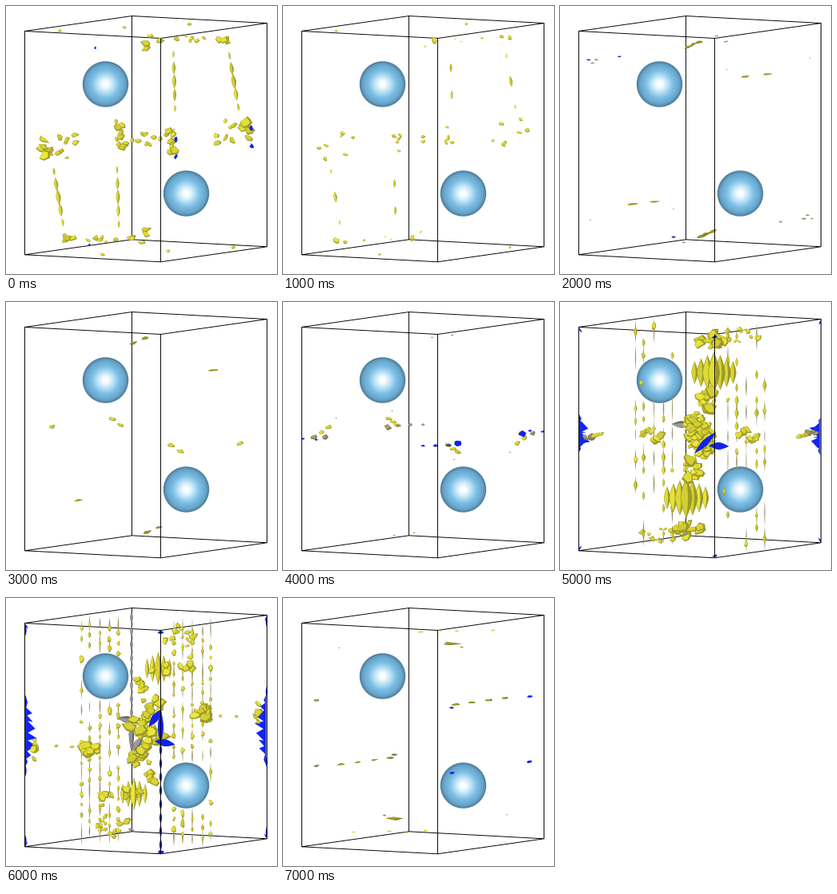
These frames come from a looping animation (339 by 336 pixels, 8 s). A matplotlib script:

```python
import numpy as np
import matplotlib.pyplot as plt
from matplotlib.animation import FuncAnimation
from matplotlib.collections import PolyCollection

W, H, DPI = 339, 336, 64
PX = 72 / DPI
MIRROR = np.array([349.5, 333.0])   # the cell is symmetric about its centre
SPHERES = [(124.5, 98.0), (225.5, 235.0)]
RADIUS = 28.7
COLUMNS = [94, 104, 117, 129, 140]

TONES = {
    "gold": (0.90, 0.88, 0.22),
    "olive": (0.66, 0.62, 0.13),
    "khaki": (0.64, 0.62, 0.42),
    "gray": (0.62, 0.62, 0.60),
    "blue": (0.08, 0.14, 0.97),
}


def place(shape, x, y, w, h, tilt):
    a = np.radians(-tilt)
    turn = np.array([[np.cos(a), np.sin(a)], [-np.sin(a), np.cos(a)]])
    return shape * (w / 2, h / 2) @ turn + (x + 0.5, y + 0.5)


def bit(rng, tone, x, y, w, h, tilt=0):
    """Small faceted fragment as a list of (polygon, colour)."""
    base = np.array(TONES[tone])
    if h > 2 * w:
        t = np.linspace(-1, 1, 7)
        side = 1 - np.abs(t) ** 1.5
        shape = np.r_[np.c_[side, t], np.c_[-side, -t]]
        light = np.c_[np.r_[side * 0.3, -side * 0.9], np.r_[t, -t] * 0.92]
    else:
        n = rng.integers(4, 8)
        a = (np.arange(n) + rng.uniform(-0.3, 0.3, n)) * 2 * np.pi / n
        r = rng.uniform(0.75, 1.3, n)
        shape = np.c_[r * np.cos(a), r * np.sin(a)]
        light = shape * 0.76 - (0.1, 0.14)
    if tone == "blue" or min(w, h) < 2.5:
        return [(place(shape, x, y, w, h, tilt), base * 0.95)]
    return [(place(shape, x, y, w, h, tilt), base * 0.68),
            (place(light, x, y, w, h, tilt), base * rng.uniform(0.9, 1.03))]


def pairs(rng, tone, twin, rows):
    """Fragments (x, y, width, height, tilt) with their inverted twins."""
    parts = []
    for x, y, *rest in rows:
        parts += bit(rng, tone, x, y, *rest)
        if twin:
            parts += bit(rng, twin, *(MIRROR - (x, y)), *rest)
    return parts


def cluster(rng, x, y, rx, ry, n, size):
    """Fragments strewn over an ellipse."""
    rows = []
    for _ in range(n):
        a, r = rng.uniform(0, 2 * np.pi), np.sqrt(rng.random())
        w = size * rng.uniform(0.7, 1.5)
        rows.append((x + rx * r * np.cos(a), y + ry * r * np.sin(a),
                     w, w * rng.uniform(0.45, 0.95), rng.uniform(-60, 60)))
    return rows


def strand(start, end, n, w, h, tilt=0, swell=0.0):
    """Evenly spaced fragments, larger in the middle when swell is set."""
    rows = []
    for t in np.linspace(0, 1, n):
        k = 1 - swell + swell * np.sin(np.pi * t)
        rows.append((*(np.array(start) * (1 - t) + np.array(end) * t), w * k, h * k, tilt))
    return rows


def sheaf(x, y, n, gap, w, h):
    """Upright spindles that shrink away from the middle one."""
    rows = []
    for i in sorted(range(-n, n + 1), key=abs, reverse=True):
        k = 1 - abs(i) / (n + 1)
        rows.append((x + gap * i, y, w * (0.4 + 0.6 * k), h * (0.4 + 0.6 * k)))
    return rows


def columns(rng, step, w, h, keep):
    rows = []
    for x in COLUMNS:
        for y in np.arange(34, 306, step) + rng.uniform(-4, 4):
            clear = all(np.hypot(x - sx, y - sy) > RADIUS + 4 for sx, sy in SPHERES)
            if clear and rng.random() < keep:
                rows.append((x, y, w * rng.uniform(0.7, 1.4), h * rng.uniform(0.6, 1.5)))
    return rows


def fringe(rng, y0, y1, depth):
    """Jagged cuts on the left cell edge and, inverted, on the right one."""
    y = np.linspace(y0, y1, 17)
    reach = np.sin(np.pi * (y - y0) / (y1 - y0)) * depth
    reach *= np.where(np.arange(17) % 2, rng.uniform(0.6, 1.2, 17), 0.25)
    slant = rng.uniform(-4, 4, 17)
    edge = np.r_[np.c_[24 + reach, y + slant], [(24, y1), (24, y0)]]
    return [(p, TONES["blue"]) for p in (edge, MIRROR - edge)]


def corners(rng):
    sides = [(25, 35, 2, 7, 30), (325, 25, 2, 7, -30)]
    front = [(193, 43, 8, 4)]
    return (pairs(rng, "blue", "blue", sides) + pairs(rng, "blue", "gray", front)
            + pairs(rng, "blue", None, [(193, 318, 8, 4)]))


def shell_rows(rng):
    return (strand((66, 31), (229, 22), 3, 5, 4)
            + strand((209, 60), (211, 128), 5, 5, 19, 0, 0.5)
            + strand((279, 62), (290, 126), 5, 6, 20, 8, 0.5)
            + cluster(rng, 184, 46, 14, 10, 6, 8)
            + cluster(rng, 232, 41, 24, 4, 6, 5)
            + cluster(rng, 275, 42, 9, 6, 4, 9)
            + cluster(rng, 50, 177, 7, 17, 7, 11)
            + cluster(rng, 75, 172, 14, 18, 8, 7)
            + cluster(rng, 143, 165, 6, 20, 9, 8)
            + cluster(rng, 170, 168, 13, 9, 4, 6))


def shell(rng):
    return (pairs(rng, "gold", "gold", shell_rows(rng))
            + pairs(rng, "blue", "gold", strand((212, 167), (212, 188), 2, 5, 7))
            + pairs(rng, "blue", None, strand((306, 153), (307, 175), 2, 5, 6)
                    + strand((111, 52), (104, 299), 2, 2.5, 4)))


def faded_shell(rng):
    rows = [(x, y, w * 0.7, h * 0.7, t) for x, y, w, h, t in shell_rows(rng)[::2]]
    return pairs(rng, "gold", "gold", rows)


def slice_rows():
    return (strand((159, 51), (173, 45), 3, 10, 3.6, 17)
            + strand((232, 88), (259, 85), 2, 12, 2.4, 6))


def slices(rng):
    return (pairs(rng, "olive", "olive", slice_rows())
            + pairs(rng, "khaki", "khaki", strand((40, 71), (45, 67), 2, 6, 2.2))
            + pairs(rng, "gray", "gray", strand((195, 37), (207, 44), 2, 6, 1.7, 8)
                    + strand((208, 79), (312, 65), 2, 2, 1))
            + pairs(rng, "blue", "gray", strand((35, 67), (74, 63), 2, 5, 2))
            + pairs(rng, "blue", None, [(141, 289, 5, 2)]))


def lobe_rows():
    return (strand((132, 146), (143, 154), 3, 10, 5, -12)
            + strand((48, 163), (57, 156), 2, 8, 5, 20))


def faded_lobes(rng):
    return (pairs(rng, "gold", "gold", lobe_rows()[::2])
            + pairs(rng, "olive", "olive", slice_rows()[::2]))


def lobes(rng):
    return (pairs(rng, "gold", "gold", lobe_rows())
            + pairs(rng, "khaki", "khaki", strand((38, 169), (52, 169), 2, 8, 6))
            + pairs(rng, "blue", "khaki", [(219, 177, 9, 8)])
            + pairs(rng, "blue", "gray", strand((175, 180), (206, 179), 3, 6, 2.8))
            + pairs(rng, "blue", "blue", strand((25, 171), (41, 172), 2, 5, 2.4))
            + pairs(rng, "blue", None, [(299, 165, 9, 8)])
            + pairs(rng, "olive", "olive", strand((66, 145), (136, 136), 2, 2, 1.6)
                    + strand((186, 44), (211, 41), 2, 3, 1.5)))


def dense(rng):
    gold = (columns(rng, 16, 4, 9, 0.5)
            + cluster(rng, 221, 41, 34, 9, 16, 6)
            + sheaf(192, 88, 3, 8, 15, 52)
            + cluster(rng, 189, 48, 17, 11, 14, 12)
            + cluster(rng, 184, 124, 10, 15, 14, 13)
            + cluster(rng, 172, 158, 18, 20, 22, 14)
            + cluster(rng, 238, 166, 19, 10, 11, 9))
    blades = [(181, 176, 8, 38, -45), (198, 180, 9, 25, 88)]
    return (pairs(rng, "khaki", "khaki", columns(rng, 32, 1.4, 26, 0.7))
            + pairs(rng, "blue", "gray", blades)
            + pairs(rng, "gold", "gold", gold)
            + pairs(rng, "blue", None, blades)
            + fringe(rng, 142, 186, 14)
            + pairs(rng, "khaki", "khaki", cluster(rng, 35, 167, 5, 6, 3, 9))
            + pairs(rng, "gold", "gold", strand((42, 167), (51, 165), 3, 8, 5, 15))
            + pairs(rng, "gold", None, strand((101, 101), (205, 238), 2, 5, 10))
            + corners(rng))


def beaded(rng):
    gold = (columns(rng, 13, 4, 7, 0.6)
            + cluster(rng, 215, 46, 36, 14, 12, 7)
            + sheaf(190, 88, 2, 7, 9, 42)
            + cluster(rng, 190, 88, 13, 13, 6, 9)
            + cluster(rng, 172, 106, 11, 12, 6, 10)
            + cluster(rng, 180, 138, 14, 16, 10, 12)
            + cluster(rng, 168, 160, 17, 16, 12, 13)
            + cluster(rng, 243, 143, 13, 9, 9, 13)
            + cluster(rng, 222, 80, 12, 22, 6, 8)
            + strand((62, 185), (82, 186), 2, 5, 4))
    blades = [(186, 150, 9, 27, -35), (193, 162, 7, 46, 0), (198, 181, 9, 26, 80)]
    seam = strand((193, 190), (193, 309), 8, 3.5, 15)
    return (pairs(rng, "khaki", "khaki", columns(rng, 26, 1.3, 22, 0.8))
            + pairs(rng, "blue", "gray", blades + seam)
            + pairs(rng, "gold", "gold", gold)
            + pairs(rng, "blue", None, blades)
            + fringe(rng, 126, 210, 14)
            + pairs(rng, "blue", "blue", strand((24, 40), (24, 304), 4, 2.5, 14))
            + pairs(rng, "gold", "gold", cluster(rng, 36, 188, 7, 14, 5, 9))
            + corners(rng))


def sheets(rng):
    return (pairs(rng, "olive", "olive", [(209, 57, 23, 4)]
                  + strand((215, 133), (277, 125), 4, 10, 2.6, 5)
                  + strand((196, 40), (223, 61), 2, 4, 2))
            + pairs(rng, "gold", "gold", strand((172, 42), (262, 40), 3, 6, 2, 5))
            + pairs(rng, "gray", "gray", [(70, 62, 2, 1.2)])
            + pairs(rng, "blue", "khaki", strand((211, 137), (308, 123), 2, 7, 3.2, 6))
            + pairs(rng, "blue", None, strand((211, 219), (308, 205), 2, 7, 3.2, 6))
            + pairs(rng, "khaki", None, [(41, 128, 7, 3.2, 6)]))


BUILDERS = [shell, faded_shell, slices, faded_lobes, lobes, dense, beaded, sheets]
scenes = [build(np.random.default_rng(i + 4)) for i, build in enumerate(BUILDERS)]

fig = plt.figure(figsize=(W / DPI, H / DPI), dpi=DPI, facecolor="white")
ax = fig.add_axes([0, 0, 1, 1])
ax.axis("off")


def draw_box():
    top = np.array([(23.5, 31.5), (193.5, 40.5), (326.5, 21.5), (157.5, 12.5)])
    low = top + (0, 280.3)
    style = dict(color="black", lw=0.95 * PX, solid_capstyle="butt", snap=False)
    for ring in (top, low):
        ax.plot(*np.vstack([ring, ring[:1]]).T, zorder=1, **style)
    for i, (a, b) in enumerate(zip(top, low)):
        ax.plot(*np.array([a, b]).T, zorder=1 if i == 3 else 4, **style)


def draw_sphere(cx, cy):
    x0, y0, n = int(cx) - 32, int(cy) - 32, 64
    yy, xx = np.mgrid[0:n, 0:n] + 0.5
    d = np.hypot(xx + x0 - cx, yy + y0 - cy)
    stops = [0, 0.15, 0.35, 0.6, 0.85, 1]
    shades = [(255, 243, 188, 124, 104, 76),
              (255, 251, 227, 190, 166, 122),
              (255, 254, 247, 229, 203, 150)]
    img = np.empty((n, n, 4))
    for k, shade in enumerate(shades):
        img[..., k] = np.interp(d / RADIUS, stops, shade) / 255
    img[..., 3] = np.clip(RADIUS - d + 0.5, 0, 1)
    ax.imshow(img, extent=(x0, x0 + n, y0 + n, y0), interpolation="nearest",
              aspect="auto", zorder=2)


draw_box()
for centre in SPHERES:
    draw_sphere(*centre)
ax.set_xlim(0, W)
ax.set_ylim(H, 0)
bits = ax.add_collection(PolyCollection([], linewidths=0, zorder=3), autolim=False)


def update(i):
    verts, colours = zip(*scenes[i])
    bits.set_verts(verts)
    bits.set_facecolor(np.clip(colours, 0, 1))
    return [bits]


anim = FuncAnimation(fig, update, frames=len(scenes), interval=1000,
                     repeat=True, repeat_delay=0, blit=False)
plt.show()
```
